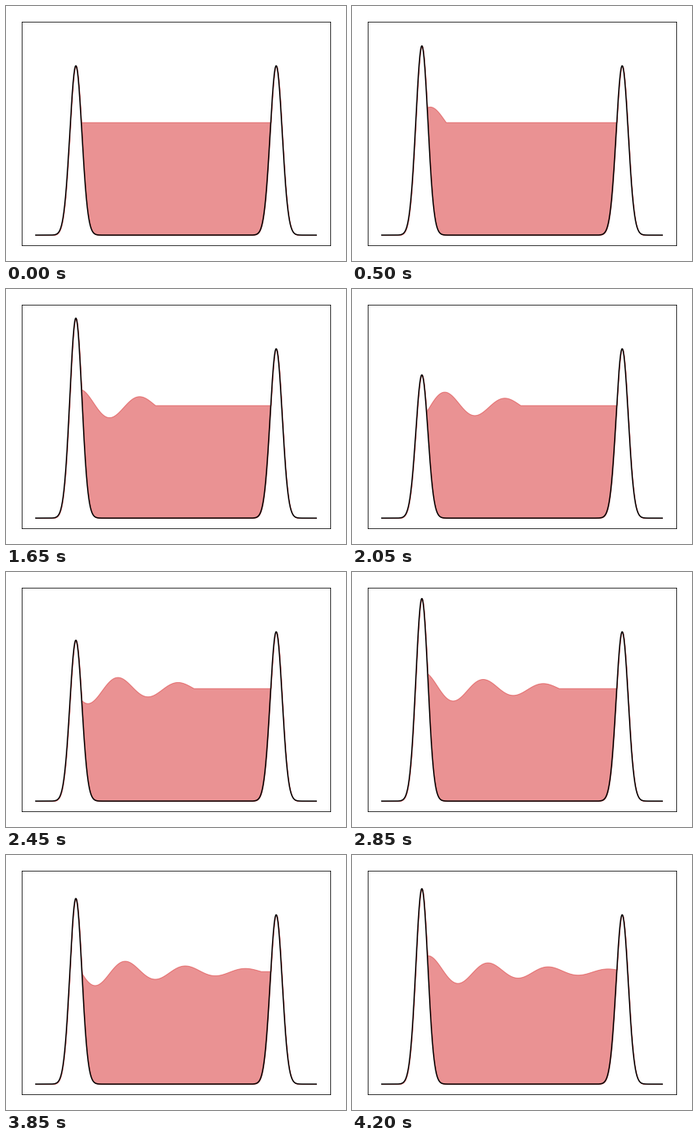
A matplotlib script that plays this animation: 432x324 px, repeating every 4.25 s.

```python
import numpy as np
import matplotlib.pyplot as plt
from matplotlib.animation import FuncAnimation

W, H, DPI = 432, 324, 72
FRAMES, INTERVAL = 85, 50

LENGTH = 5.0        # distance between the walls
SIGMA = 0.15        # wall width
WALL, SWING = 1.5, 0.3
LEVEL, AMP, DECAY = 1.0, 0.15, 0.4
WAVELENGTH, PERIOD = 1.5, 25
SPEED = WAVELENGTH / PERIOD

x = np.linspace(-1, LENGTH + 1, 1401)
inside = (x > 0) & (x < LENGTH)


def bump(center, height):
    return height * np.exp(-(x - center) ** 2 / (2 * SIGMA ** 2))


def walls(n):
    left = WALL + SWING * np.sin(2 * np.pi * n / PERIOD)
    return bump(0, left) + bump(LENGTH, WALL)


def surface(n):
    delay = np.maximum(n - x / SPEED, 0)
    wave = AMP * np.exp(-DECAY * x) * np.sin(2 * np.pi * delay / PERIOD)
    return LEVEL + wave


fig = plt.figure(figsize=(W / DPI, H / DPI), dpi=DPI, facecolor="white")
ax = fig.add_axes([20 / W, 20 / H, (W - 40) / W, (H - 40) / H])
ax.set(xlim=(-1.35, 6.35), ylim=(-0.09, 1.89), xticks=[], yticks=[])
line, = ax.plot(x, walls(0), color="black", lw=1.5)
fill = None


def update(n):
    global fill
    base = walls(n)
    top = np.where(inside, np.maximum(base, surface(n)), base)
    if fill is not None:
        fill.remove()
    fill = ax.fill_between(x, base, top, color="tab:red", alpha=0.5)
    line.set_ydata(base)
    return fill, line


anim = FuncAnimation(fig, update, frames=FRAMES, interval=INTERVAL,
                     repeat=True, repeat_delay=0, blit=False)
plt.show()
```
